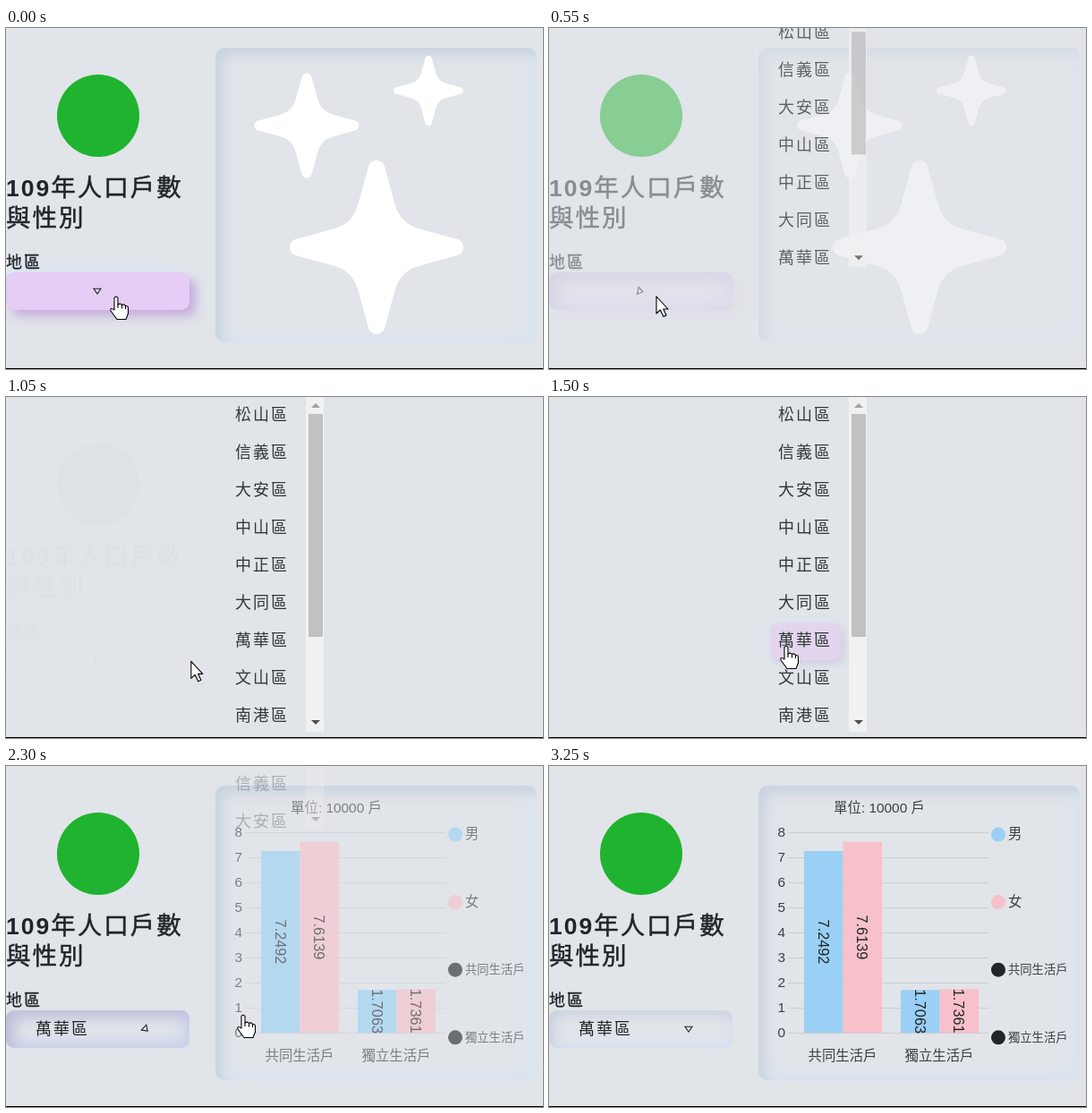
These frames come from a looping animation (600x381 px, 3300 ms). An HTML page:

```html
<!DOCTYPE html>
<html lang="zh-Hant-TW">
<head>
<meta charset="utf-8">
<style>
  html, body { margin: 0; height: 100%; overflow: hidden; background: #e1e4e9; }
  body { position: relative; color: #212529; font: 18px "Liberation Sans", "Noto Sans CJK TC", "Noto Sans CJK", sans-serif; }
  div, svg { position: absolute; }
  svg { left: 0; top: 0; overflow: visible; }
  #page { inset: 0; }
  #panel { left: 234px; top: 22px; width: 359px; height: 329px; border-radius: 10px;
    box-shadow: inset 8px 8px 14px #c9d3df, inset -8px -8px 14px #dbe5f2; }
  .button { left: 0; top: 273px; width: 205px; height: 42px; border-radius: 9px; }
  #base { box-shadow: inset 6px 6px 12px #cbd2df, inset -6px -6px 12px #d9e2f1; }
  #focus { box-shadow: inset 8px 6px 18px #c0bedb, inset -8px -6px 18px #cdd4ec; }
  #lilac { background: #e6cdf5; box-shadow: 7px 7px 12px #c5addd, -6px -6px 14px #dfe9f5; }
  #list { left: 234px; top: 0; width: 121px; overflow: hidden; }
  .item { left: 13px; width: 80px; height: 42px; line-height: 41px; text-indent: 9px; letter-spacing: 2px;
    white-space: nowrap; font-weight: 300; color: #33373b; }
  #hover { left: 13px; top: 252px; width: 79px; height: 42px; border-radius: 9px;
    background: #e5c9f4; box-shadow: 4px 4px 8px #c3b8de, -4px -4px 8px #dce6f2; }
  #track { left: 101px; top: 0; width: 20px; height: 100%; background: #f1f1f1; }
  #thumb { left: 3px; top: 19px; width: 16px; background: #c1c1c1; }
  .arrow { left: 6px; border: 5px solid transparent; }
  #up { top: 3px; border-bottom-color: #a3a3a3; border-top: 0; margin-top: 4px; }
  #down { bottom: 8px; border-top-color: #505050; border-bottom: 0; }
  #edge { left: 0; top: 380px; width: 100%; height: 1px; background: #000; }
  .spaced { letter-spacing: 2px; }
  .heading { font-size: 27.5px; stroke: #212529; stroke-width: .5px; }
  .heading tspan { font-size: 26.5px; font-weight: 700; stroke: none; }
  #chart { font-size: 15.4px; font-weight: 300; fill: #3c4045; }
</style>
</head>
<body>
<div id="page">
  <div id="panel"></div>
  <div id="base" class="button"></div>
  <div id="focus" class="button"></div>
  <div id="lilac" class="button"></div>
  <svg width="600" height="381" fill="#212529">
    <circle cx="103" cy="98" r="46" fill="#1fb32f"/>
    <g class="spaced">
      <g class="heading">
        <text y="188"><tspan>109</tspan>年人口戶數</text>
        <text y="222">與性別</text>
      </g>
      <text y="268" stroke="#212529" stroke-width=".3">地區</text>
      <text id="choice" x="33" y="300">萬華區</text>
    </g>
    <path id="caret" d="M-4 -2.7H4L0 3Z" fill="none" stroke="#212529" stroke-width="1.1"/>
    <g id="stars" fill="#fff"></g>
    <g id="chart"></g>
  </svg>
</div>
<div id="list">
  <div id="hover"></div>
  <div id="track">
    <div id="up" class="arrow"></div>
    <div id="thumb"></div>
    <div id="down" class="arrow"></div>
  </div>
</div>
<div id="edge"></div>
<svg width="600" height="381">
  <g id="cursor" fill="#fff" stroke="#000" stroke-width="1.1" stroke-linejoin="round">
    <path id="pointer" d="M0 0V19L4.3 15 8 22.5 11 21 7.8 14H13Z"/>
    <g id="hand">
      <path d="M-2 1.5Q0 -1 2 1.5V9Q4.500 7 6.500 9.500Q9 8 10.500 10.500Q13.500 10 13.500 13V19L11 25.500H1L-6 16Q-7 11.500 -2 15Z"/>
      <path d="M2 9V13M6.500 9.500V13.500M10.500 10.500V14" fill="none"/>
    </g>
  </g>
</svg>
<script>
const LOOP = 3300, ROW = 42;
const $ = id => document.getElementById(id);
const districts = '松山 信義 大安 中山 中正 大同 萬華 文山 南港 內湖 士林 北投'.split(' ');

districts.forEach((name, i) =>
  $('list').insertAdjacentHTML('beforeend', `<div class="item" style="top:${i * ROW}px">${name}區</div>`));

const arm = 'M0 0L-47 -22Q-28 -28 -22 -47L-9 -94C-6 -102 6 -102 9 -94L22 -47Q28 -28 47 -22Z';
$('stars').innerHTML = [[336, 109, 58.5], [472, 70, 39], [414, 245, 97]].map(([x, y, r]) =>
  `<g transform="translate(${x} ${y}) scale(${r / 100})">` +
  [0, 90, 180, 270].map(a => `<path d="${arm}" transform="rotate(${a})"/>`).join('') + '</g>').join('');

function buildChart() {
  const blue = '#9ad0f5', pink = '#f8c0ca', dark = '#212529';
  const label = (x, y, text, extra = 'text-anchor="middle"') => `<text x="${x}" y="${y}" ${extra}>${text}</text>`;
  const yOf = v => 298 - 28 * v;
  let out = label(369, 52, '單位: 10000 戶');
  for (let v = 0; v <= 8; v++) {
    out += `<path d="M267 ${yOf(v) + .5}H491" stroke="#000" stroke-opacity=".1"/>`;
    out += label(264, yOf(v) + 5, v, 'text-anchor="end"');
  }
  [['共同生活戶', 285, 7.2492, 7.6139], ['獨立生活戶', 393, 1.7063, 1.7361]].forEach(([name, left, ...values]) => {
    out += label(left + 43, 329, name);
    values.forEach((v, i) => {
      const x = left + i * 43.5;
      out += `<rect x="${x}" y="${yOf(v)}" width="43.5" height="${28 * v}" fill="${i ? pink : blue}"/>`;
      out += label(0, 6, v, `text-anchor="middle" font-size="16.3" fill="${dark}" transform="translate(${x + 21.5} ${yOf(v / 2)}) rotate(90)"`);
    });
  });
  [['男', blue], ['女', pink], ['共同生活戶', dark], ['獨立生活戶', dark]].forEach(([name, color], i) => {
    const y = 76.500 + i * 75.6;
    out += `<circle cx="502" cy="${y}" r="8" fill="${color}"/>`;
    out += label(513, y + 4.5, name, `font-size="${i < 2 ? 15.4 : 13.3}"`);
  });
  return out;
}
$('chart').innerHTML = buildChart();

// cubic-bezier(.25, .1, .25, 1)
function ease(x) {
  if (x <= 0) return 0;
  if (x >= 1) return 1;
  const bezier = (s, a, b) => 3 * s * (1 - s) * ((1 - s) * a + s * b) + s ** 3;
  let lo = 0, hi = 1;
  for (let i = 0; i < 20; i++) {
    const mid = (lo + hi) / 2;
    if (bezier(mid, .25, .25) < x) lo = mid; else hi = mid;
  }
  return bezier(lo, .1, 1);
}

// cursor stops: time, x, y
const stops = [[0, 120, 300], [850, 120, 300], [1140, 232, 294], [1360, 265, 278], [2450, 265, 278], [2800, 300, 384], [LOOP, 300, 384]];
function cursorAt(t) {
  const i = stops.findIndex(s => s[0] > t);
  const [t0, x0, y0] = stops[i - 1], [t1, x1, y1] = stops[i];
  const k = (t - t0) / (t1 - t0), s = k * k * (3 - 2 * k);
  return [x0 + (x1 - x0) * s, y0 + (y1 - y0) * s];
}

function draw(t) {
  const ramp = (start, length) => ease((t - start) / length);
  const open = ramp(95, 1000) - ramp(1930, 900);
  const turn = ramp(95, 800) - ramp(1960, 1200);
  const chosen = t >= 1900;

  $('page').style.opacity = 1 - ramp(250, 950) + ramp(1935, 370);
  $('lilac').style.opacity = 1 - ramp(95, 900);
  $('focus').style.opacity = ramp(95, 900) - ramp(2350, 900);
  $('choice').style.display = chosen ? '' : 'none';
  $('caret').setAttribute('transform', `translate(${chosen ? 156 : 102} 294) rotate(${-90 * turn})`);
  $('stars').style.display = chosen ? 'none' : '';
  $('chart').style.opacity = ramp(1975, 920);

  const height = 374 * open;
  const list = $('list').style;
  list.opacity = open;
  list.height = height + 'px';
  list.transform = `translateY(${-60 * (1 - open)}px)`;
  $('thumb').style.height = Math.max(0, height - 38) * height / (ROW * districts.length) + 'px';
  $('hover').style.opacity = ramp(1380, 400);

  const hand = t < 100 || t >= 1300 && t < 2450;
  const [x, y] = cursorAt(t);
  $('cursor').setAttribute('transform', `translate(${x + (t < 100 ? 3 : 0)} ${y})`);
  $('cursor').style.display = t < 2800 ? '' : 'none';
  $('hand').style.display = hand ? '' : 'none';
  $('pointer').style.display = hand ? 'none' : '';
}

const begin = performance.now();
(function tick() {
  draw((performance.now() - begin) % LOOP);
  requestAnimationFrame(tick);
})();
</script>
</body>
</html>
```
